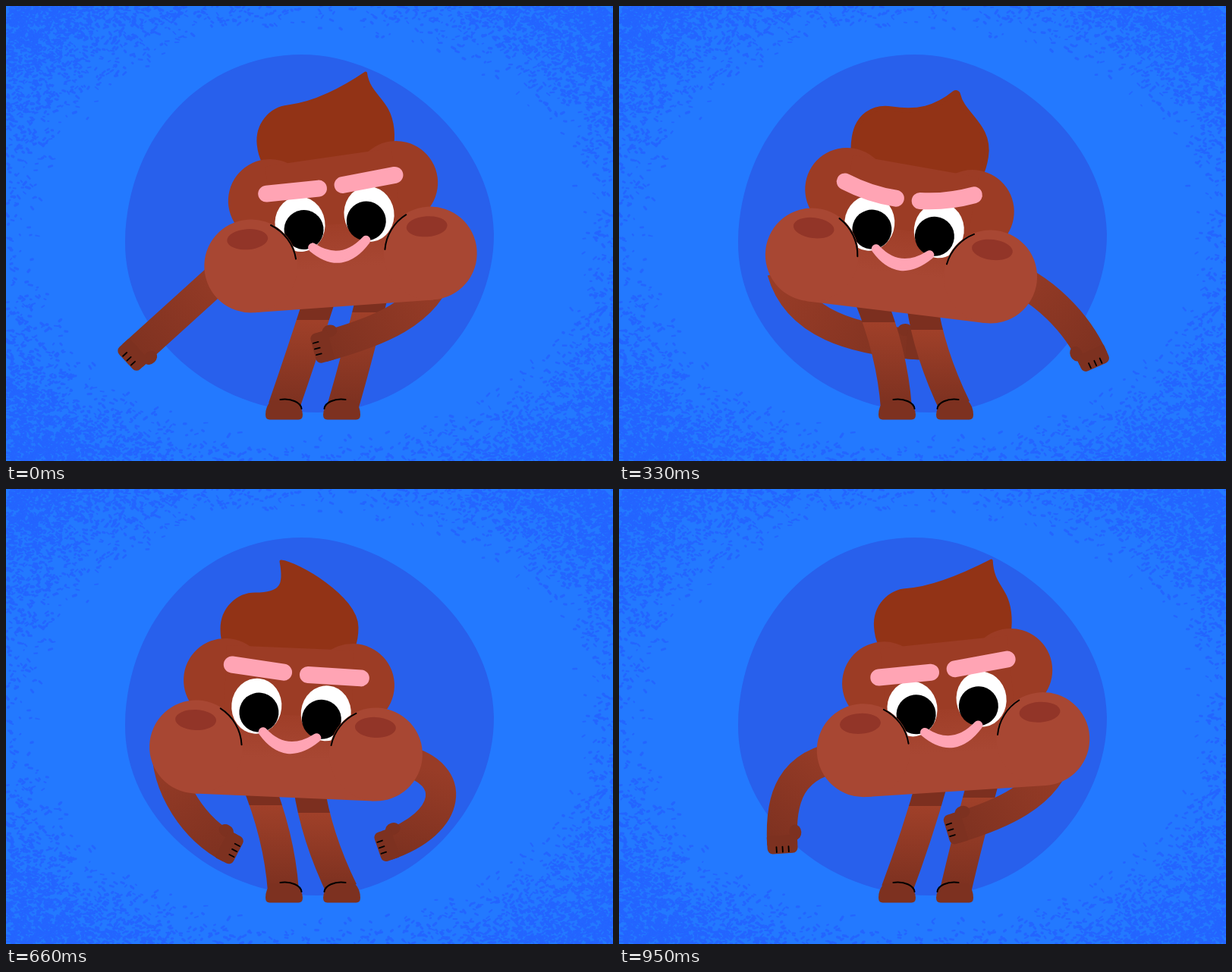
An HTML page with a canvas for the animation above (1 s loop, 800 px wide and 600 px high).

```html
<!DOCTYPE html>
<html>
<head>
<meta charset="utf-8">
<title>Floss dance</title>
<style>
html, body { margin: 0; width: 100%; height: 100%; overflow: hidden; background: #2379ff; }
canvas { display: block; }
</style>
</head>
<body>
<canvas id="stage" width="800" height="600"></canvas>
<script>
const g = document.getElementById('stage').getContext('2d');
const TAU = Math.PI * 2, RAD = Math.PI / 180;
const PINK = '#ffa4b4', CHEEK = '#a84733', DARK = '#7d3120';

// Closed spline through keys that are two steps apart
function spline(keys, k) {
  const n = keys.length, x = k / 2, i = Math.floor(x), u = x - i;
  const [a, b, c, d] = [-1, 0, 1, 2].map(j => keys[(i + j + n) % n]);
  return b + u / 2 * (c - a + u * (2 * a - 5 * b + 4 * c - d + u * (3 * (b - c) + d - a)));
}
// Values before, at and after a beat; odd ones flip sign on every beat
const odd = (k, m, z, p) => spline([z, p, -m, -z, -p, m], k);
// Even ones repeat, with a slow rest on the beat
function even(k, m, z, p) {
  const q = (k + 3) % 6 - 3;
  const side = q === -3 ? (m + p) / 2 : q < 0 ? m : p;
  return z + (side - z) * [0, 0.25, 1, 1.35][Math.abs(q)];
}

// Arm curves: shoulder, two handles, hand end
const LEFT = [
  [300, 340, 253, 383, 196, 434, 158, 469],
  [300, 345, 245, 372, 201, 430, 164, 485],
  [212, 335, 210, 395, 250, 450, 306, 479],
  [228, 345, 245, 400, 315, 435, 394, 471],
  [215, 350, 235, 420, 310, 440, 403, 447],
  [285, 355, 190, 365, 185, 435, 311, 442]
];
const RIGHT = [
  [572, 345, 555, 405, 490, 430, 405, 453],
  [572, 350, 560, 410, 490, 438, 398, 462],
  [525, 358, 595, 375, 590, 440, 490, 474],
  [505, 345, 550, 390, 595, 437, 641, 484],
  [500, 350, 560, 370, 605, 420, 630, 476],
  [592, 335, 600, 400, 555, 430, 488, 449]
];
// The last tuck of the loop hangs lower
const leftKeys = [...LEFT, ...LEFT.slice(0, 5), [290, 363, 200, 345, 237, 391, 289, 489]];
const rightKeys = [...RIGHT, ...RIGHT.slice(0, 5), [579, 346, 574, 402, 521, 430, 477, 453]];

function disc(x, y, rx, color, ry = rx) {
  g.fillStyle = color;
  g.beginPath();
  g.ellipse(x, y, rx, ry, 0, 0, TAU);
  g.fill();
}
function line(color, width, draw, cap = 'round') {
  g.strokeStyle = color;
  g.lineWidth = width;
  g.lineCap = cap;
  g.lineJoin = 'round';
  g.beginPath();
  draw();
  g.stroke();
}
function within(x, y, deg, draw) {
  g.save();
  g.translate(x, y);
  g.rotate(deg * RAD);
  draw();
  g.restore();
}
function fade(x0, y0, x1, y1, ...stops) {
  const f = g.createLinearGradient(x0, y0, x1, y1);
  for (const [at, color] of stops) f.addColorStop(at, color);
  return f;
}

function makeBackdrop() {
  const c = document.createElement('canvas');
  c.width = 800;
  c.height = 600;
  const b = c.getContext('2d');
  b.fillStyle = '#2379ff';
  b.fillRect(0, 0, 800, 600);
  let seed = 7;
  const rnd = () => (seed = seed * 16807 % 2147483647) / 2147483647;
  b.strokeStyle = '#2465ff';
  b.lineCap = 'round';
  for (let i = 0; i < 70000; i++) {
    const x = rnd() * 800, y = rnd() * 600, a = rnd() * 2 - 1, len = 1 + rnd() * 4;
    const r = Math.hypot((x - 400) / 400, (y - 300) / 300);
    if (r < 0.88 || rnd() > ((r - 0.88) / 0.5) ** 1.5) continue;
    b.lineWidth = 1.5 + rnd() * 2;
    b.beginPath();
    b.moveTo(x, y);
    b.lineTo(x + len * Math.cos(a), y + len * Math.sin(a));
    b.stroke();
  }
  b.fillStyle = '#2860ec';
  b.fill(new Path2D('M157 310C160 170 260 64 390 64C510 64 642 176 643 300C644 420 540 536 410 536C270 536 155 430 157 310Z'));
  return c;
}
const backdrop = makeBackdrop();

function arm(keys, k, thumb) {
  const [x0, y0, x1, y1, x2, y2, x, y] = keys[0].map((_, i) => spline(keys.map(p => p[i]), k));
  const angle = Math.atan2(y - y2, x - x2);
  const bx = x - 12 * Math.cos(angle), by = y - 12 * Math.sin(angle);
  line(fade(x0, y0, x, y, [0, '#983c27'], [1, DARK]), 40, () => {
    g.moveTo(x0, y0);
    g.bezierCurveTo(x1, y1, x2, y2, bx, by);
  }, 'butt');
  within(x, y, angle / RAD, () => {
    disc(-27, thumb * 18, 10, DARK, 8);
    g.fillStyle = DARK;
    g.beginPath();
    g.roundRect(-24, -20, 24, 40, [2, 7, 7, 2]);
    g.fill();
    for (const f of [-8, 0, 8])
      line('#000', 1.8, () => { g.moveTo(-9, f); g.lineTo(-2, f); });
  });
}

function leg(k, side) {
  const bend = even(k, 1, 0, 1);
  const hx = 400 + odd(k, 36, 51, 36) + side * 35;
  const hy = 373 + 13 * bend - side * odd(k, 5, 5, 5);
  const fx = 404.5 + side * 39;
  const shade = 36 / (525 - hy);
  const color = fade(0, hy, 0, 525, [0, '#7c2f1f'], [shade, '#7c2f1f'], [shade, '#a04029'], [1, DARK]);
  line(color, 41, () => {
    g.moveTo(hx, hy);
    g.quadraticCurveTo((hx + fx) / 2 - side * 13 * bend, 457, fx, 530);
  }, 'butt');
  g.save();
  g.translate(404.5, 0);
  g.scale(-side, 1);
  g.fillStyle = DARK;
  g.fill(new Path2D('M-62.5 539Q-62.5 528-55 520H-24Q-13.5 529-13.5 539Q-13.5 545.5-19 545.5H-57Q-62.5 545.5-62.5 539Z'));
  line('#000', 2, () => {
    g.moveTo(-43, 519);
    g.bezierCurveTo(-28, 517, -16, 523, -15, 531);
  });
  g.restore();
}

function head(k) {
  const a = odd(k, 0, -6, -9) * RAD, c = Math.cos(a), s = Math.sin(a);
  const at = (x, y) => [x * c - y * s, x * s + y * c];
  const round = even(k, 2, 2, 6);
  const side = 91 - round, top = round - 46;
  const lean = odd(k, 39, 25, -19), u = lean / 39;
  const tx = 28 + lean, ty = even(k, -83, -87.5, -81.5) + odd(k, 6, 2.5, -7.5) + round;
  within(400 + odd(k, 26.5, 21, 3), even(k, 182.5, 171.5, 185), 0, () => {
    g.fillStyle = '#923316';
    line('#923316', round * 2, () => {
      g.moveTo(...at(-72, 42));
      g.bezierCurveTo(...at(3 - side, 32), ...at(-side, 16), ...at(-side, 2));
      g.bezierCurveTo(...at(-side, -25), ...at(-68, top), ...at(-45, top));
      g.bezierCurveTo(...at(-10, top), tx - 15 - 21 * u, ty + 24 - 7 * u, tx, ty);
      g.bezierCurveTo(tx + 11 - 10 * u, ty + 20 + 18 * u, ...at(side, -40), ...at(side, 0));
      g.bezierCurveTo(...at(side, 16), ...at(side - 3, 32), ...at(72, 42));
      g.closePath();
    });
    g.fill();
  });
}

function middle(k) {
  within(400 + odd(k, 27, 31, 17), even(k, 255.5, 245, 256.5), odd(k, -2.4, -8.2, -10), () => {
    const color = '#9c3c25';
    disc(-84, 0, 55, color);
    disc(84, 0, 55, color);
    g.fillRect(-84, -46, 168, 101);
  });
}

function inFace(k, draw) {
  within(400 + odd(k, 24, 33, 24), even(k, 291, 281, 291), odd(k, -6, -8.3, -6), draw);
}

function eyes() {
  disc(-46, 0, 33, '#fff', 36.5);
  disc(46, 0, 33, '#fff', 36.5);
  disc(-42, 8, 26, '#000');
  disc(41, 8.5, 26, '#000');
}

function browsAndMouth(k) {
  const lift = even(k, 5, 0, 5), frown = even(k, 0, 0, 12);
  const brow = (outer, inner) => line(PINK, 22, () => {
    g.moveTo(outer, -46 - lift);
    g.quadraticCurveTo((outer + inner) / 2, -44.5 - lift + frown, inner, -43 - lift + frown);
  });
  brow(-84, -15);
  brow(87, 17);
  g.fillStyle = PINK;
  line(PINK, 12, () => {
    g.moveTo(-34, 33);
    g.quadraticCurveTo(0, 71, 37, 33.5);
    g.quadraticCurveTo(0, 63, -34, 33);
  });
  g.fill();
}

function inBase(k, draw) {
  within(400 + odd(k, 31, 41, 28), even(k, 345, 334.5, 342.5), odd(k, -2.4, -4.1, -7), draw);
}

function chin() {
  g.fillStyle = fade(0, -47, 0, 10, [0, '#9f3e28'], [1, CHEEK]);
  g.fillRect(-118, -47, 236, 108.5);
}

function cheeks() {
  for (const side of [-1, 1]) {
    const x = side * 118.5;
    disc(x, 0, 61.5, CHEEK);
    disc(x - 2, -35.5, 27, '#923528', 13.5);
    const [from, to] = side < 0 ? [-60, -5] : [189, 242];
    line('#000', 2, () => g.arc(x, 0, 60, from * RAD, to * RAD));
  }
}

function draw(k) {
  const leftArm = () => arm(leftKeys, k, -1);
  const rightArm = () => arm(rightKeys, k, 1);
  const leftFront = k >= 12, rightFront = k < 6 || k >= 18;
  g.drawImage(backdrop, 0, 0);
  if (!leftFront) leftArm();
  if (!rightFront) rightArm();
  leg(k, -1);
  leg(k, 1);
  if (leftFront) leftArm();
  if (rightFront) rightArm();
  head(k);
  middle(k);
  inBase(k, chin);
  inFace(k, eyes);
  inBase(k, cheeks);
  inFace(k, () => browsAndMouth(k));
}

const start = performance.now();
function tick() {
  const t = (performance.now() - start) % 1000;
  // The dance steps at 24 poses per second
  draw(Math.min(23, Math.floor((t + 9) * 0.024)));
  requestAnimationFrame(tick);
}
tick();
</script>
</body>
</html>
```
